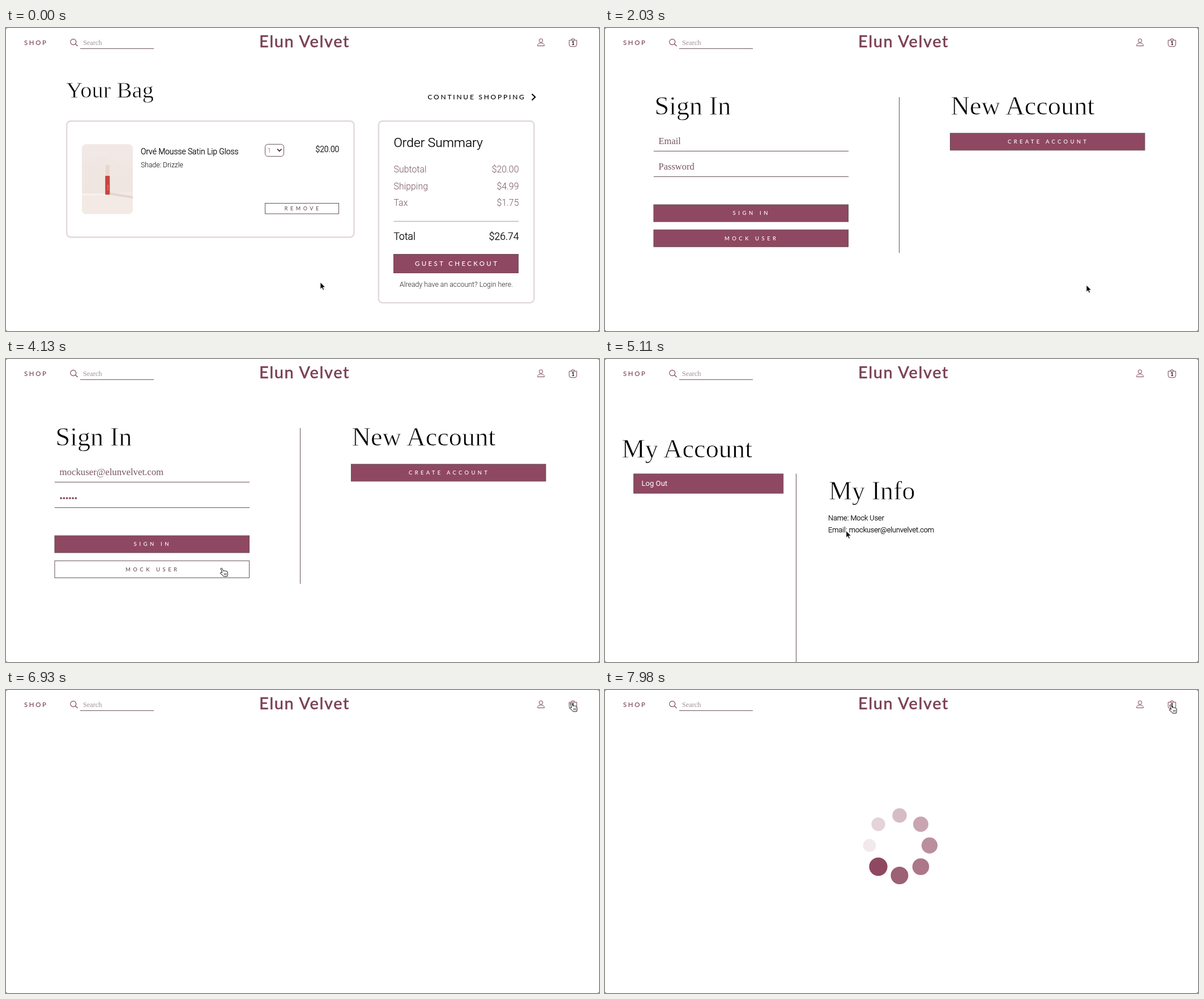
An HTML page for the animation above (8 s loop, 1047 px wide and 535 px high).

```html
<!DOCTYPE html>
<html lang="en">
<head>
<meta charset="utf-8">
<title>Shop checkout</title>
<style>
  html, body { margin: 0; width: 100%; height: 100%; overflow: hidden; background: #fff; }
  svg { display: block; width: 100vw; height: 100vh; }
  text { white-space: pre; }
  .serif { font-family: "Liberation Serif", serif; }
  .title { font-family: "Liberation Serif", serif; stroke: #fff; stroke-width: .8px; }
  .sans { font-family: Roboto, sans-serif; font-weight: 300; }
  .ink { font-family: Roboto, sans-serif; font-weight: 300; stroke: #000; stroke-width: .25px; }
  .caps { font-family: Lato, sans-serif; font-weight: 500; }
</style>
</head>
<body>
<svg id="stage" viewBox="0 0 1047 535" preserveAspectRatio="none"></svg>
<script>
const LOOP = 8000;
const PLUM = '#8f4861', DARK = '#7b4054', MUTED = '#775561', INK = '#000', LINE = '#67505a';

const text = (cls, x, y, size, str, fill = INK, extra = '') =>
  `<text class="${cls}" x="${x}" y="${y}" font-size="${size}" fill="${fill}" ${extra}>${str}</text>`;
const serif = (...a) => text('serif', ...a);
const title = (...a) => text('title', ...a);
const sans = (...a) => text('sans', ...a);
const ink = (x, y, size, str, extra) => text('ink', x, y, size, str, INK, extra);
const END = 'text-anchor="end"', MIDDLE = 'text-anchor="middle"';
const caps = (x, y, size, gap, str, fill, extra = '') =>
  text('caps', x, y, size, str, fill, `letter-spacing="${gap}" ${extra}`);
const capsMid = (x, y, size, gap, str, fill, extra = '') =>
  caps(x + gap / 2, y, size, gap, str, fill, `${MIDDLE} ${extra}`);
const line = (d, color = LINE, width = 1) =>
  `<path d="${d}" fill="none" stroke="${color}" stroke-width="${width}"/>`;
const box = (x, y, w, h, fill, extra = '') =>
  `<rect x="${x}" y="${y}" width="${w}" height="${h}" fill="${fill}" ${extra}/>`;
const card = (x, y, w, h) => box(x, y, w, h, 'none', 'rx="7" stroke="#e5dbde" stroke-width="2.7"');
const button = (x, y, w, h, extra = '') => box(x, y, w, h, PLUM, `stroke="${LINE}" stroke-width="1" ${extra}`);

const header = `
  ${caps(32, 30, 11.5, 2.6, 'SHOP', DARK)}
  <circle cx="118.8" cy="24.6" r="5" fill="none" stroke="${DARK}" stroke-width="1.1"/>
  ${line('M122.5 28.2L126.6 32', DARK, 1.2)}
  ${serif(136, 30, 12.3, 'Search', '#a08f96')}
  ${line('M131 36.4H261')}
  ${capsMid(526.3, 33.8, 29, 1.6, 'Elun Velvet', DARK, `stroke="${DARK}" stroke-width=".4"`)}
  <circle cx="944.5" cy="22.2" r="3.2" fill="none" stroke="${DARK}"/>
  ${line('M938.5 31.5C938.5 28 941 26.6 944.5 26.6S950.5 28 950.5 31.5Z', DARK)}
  ${line('M994.3 21.6H1007.7V29Q1007.7 32.8 1004 32.8H998Q994.3 32.8 994.3 29Z', DARK)}
  ${line('M997.8 21.5Q998 18.8 1001 18.8T1004.2 21.5', DARK)}
  <text class="caps" x="1001" y="30.4" font-size="9" text-anchor="middle" fill="${INK}" style="font-weight:700">1</text>`;

const photo = `
  <g clip-path="url(#photoClip)">
    ${box(134, 205, 90, 124, 'url(#wall)')}
    <path d="M134 238L172 226 224 248V205H134Z" fill="#f4ece9" opacity=".5"/>
    <path d="M134 294L224 289V328H134Z" fill="#f3eae5"/>
    <path d="M182 290L224 297V301L180 294Z" fill="#e4d6cf"/>
    <path d="M134 292L175 293V295L134 296Z" fill="#f8f2ef"/>
    ${box(175.8, 242, 7, 20, '#ead6ce')}
    ${box(175.2, 261, 8, 33.3, '#c8443c', 'rx="1"')}
    <text class="sans" transform="translate(180.6 287) rotate(-90)" font-size="4" fill="#f6d6d0">tinted</text>
  </g>`;

const summary = [['Subtotal', '$20.00', 255], ['Shipping', '$4.99', 284.5], ['Tax', '$1.75', 313.5]]
  .map(([name, cost, y]) => sans(684.5, y, 15.9, name, MUTED) + sans(905.5, y, 15.9, cost, MUTED, END)).join('');

const bag = `
  ${title(106, 123, 40.6, 'Your Bag')}
  ${caps(744.5, 126.3, 12, 2.75, 'CONTINUE SHOPPING', INK)}
  ${line('M928.5 116.5L934.3 122 928.5 127.5', INK, 2)}
  ${card(107.2, 164.3, 507.3, 205)}
  ${photo}
  ${ink(238, 222.5, 13.8, 'Orvé Mousse Satin Lip Gloss')}
  ${sans(238, 246, 12.2, 'Shade: Drizzle')}
  <rect x="457.5" y="205.3" width="33" height="21.4" rx="5" fill="none" stroke="${LINE}"/>
  ${sans(461.5, 220, 11.5, '1', MUTED)}
  ${line('M479 213.7L482.8 217.4 486.6 213.7', '#4a3038', 1.8)}
  ${ink(588.3, 219, 13.9, '$20.00', END)}
  <rect x="457.5" y="309.5" width="130" height="18.5" fill="#fff" stroke="${LINE}"/>
  ${capsMid(522, 321.8, 9, 4.6, 'REMOVE', LINE)}
  ${card(657.8, 164.3, 274.6, 320.8)}
  ${ink(684.5, 210, 22.7, 'Order Summary')}
  ${summary}
  ${line('M684.5 341.3H905', '#a89ca0')}
  ${ink(684.5, 374.3, 17.5, 'Total')}${ink(905.5, 374.3, 17.5, '$26.74', END)}
  ${button(684.5, 399.5, 220, 33)}
  ${capsMid(794.5, 420.3, 11.5, 3.35, 'GUEST CHECKOUT', '#fff')}
  ${sans(795, 456.5, 12.35, 'Already have an account? Login here.', '#222', MIDDLE)}`;

const signIn = `
  ${title(87.5, 152.5, 46.2, 'Sign In')}
  ${title(610.5, 152.5, 46.4, 'New Account')}
  ${line('M519.5 122V397')}
  ${line('M86 217.4H430M86 262.5H430')}
  <g id="blank">${serif(94.5, 205, 16.5, 'Email', MUTED)}${serif(94.5, 250, 16.5, 'Password', MUTED)}</g>
  <g id="filled">${serif(94.5, 205, 16.8, 'mockuser@elunvelvet.com', MUTED)}${serif(94.5, 251, 15, '••••••', DARK)}</g>
  ${button(86, 312, 343.5, 30)}
  ${capsMid(256.5, 330.4, 9.5, 4.6, 'SIGN IN', '#fff')}
  ${button(86, 356.3, 343.5, 30, 'id="demo"')}
  ${capsMid(256.5, 374.6, 9.5, 4.5, 'MOCK USER', '#fff', 'id="demoLabel"')}
  ${button(609.5, 185.8, 343.5, 30)}
  ${capsMid(780.5, 204.3, 9.5, 4.3, 'CREATE ACCOUNT', '#fff')}`;

const account = `
  ${title(29.5, 173.5, 46.4, 'My Account')}
  ${button(50.7, 202.9, 264, 34.2)}
  ${sans(64.5, 224.3, 13.1, 'Log Out', '#fff', 'style="font-weight:400"')}
  ${line('M337.5 202.5V535')}
  ${title(395, 248, 46.2, 'My Info')}
  ${ink(394, 284.5, 12.7, 'Name: Mock User')}
  ${ink(394, 305.5, 12.7, 'Email: mockuser@elunvelvet.com')}`;

const dots = Array.from({ length: 8 }, (_, i) => {
  const a = (i - 1) * Math.PI / 4;
  return `<circle cx="${520 + 53 * Math.cos(a)}" cy="${274.5 + 53 * Math.sin(a)}" fill="${PLUM}"/>`;
}).join('');

const stage = document.getElementById('stage');
stage.innerHTML = `
  <defs>
    <clipPath id="photoClip"><rect x="134" y="205" width="90" height="123.5" rx="8"/></clipPath>
    <linearGradient id="wall" x2="0" y2="1">
      <stop stop-color="#f0e7e4"/><stop offset="1" stop-color="#efe5e0"/>
    </linearGradient>
  </defs>
  ${box(0, 0, 1047, 535, '#fff')}
  ${header}
  <g id="bag">${bag}</g>
  <g id="signIn">${signIn}</g>
  <g id="account">${account}</g>
  <g id="spinner">${dots}</g>
  <g id="cursor">
    <circle id="ring" r="27" fill="none" stroke="#111" stroke-width="1.5"/>
    <path id="arrow" d="M0 0V12L2.8 9.5 4.6 13.8 6.6 13 4.8 8.8H8.6Z" fill="#000" stroke="#fff" stroke-width=".8"/>
    <g id="hand" stroke="#111" stroke-linejoin="round">
      <path d="M-3 .9Q-1.5-.6-.4.9L1.6 5.2Q3.2 4.2 4.2 5.3 5.9 4.5 6.8 5.7 8.4 5.4 8.9 7L9.4 10.5Q9.2 12.5 8.6 15H2.2Q.6 12-3.6 9.6-4.2 7.8-2 7.8L-.2 8.2Z" fill="#fff"/>
      <path d="M3.4 9.4V12.4M5.2 9.4V12.4M7 9.4V12.4" fill="none" stroke-width=".8"/>
    </g>
  </g>
  <path d="M0 0H3Q0 0 0 3ZM1047 0H1044Q1047 0 1047 3ZM0 535H3Q0 535 0 532ZM1047 535H1044Q1047 535 1047 532Z" fill="#444"/>`;

const el = id => document.getElementById(id);
const show = (id, on) => el(id).setAttribute('display', on ? 'inline' : 'none');
const clamp = v => Math.min(1, Math.max(0, v));
const within = (t, a, b) => t >= a && t < b;
const mix = (a, b, k) => `rgb(${a.map((v, i) => Math.round(v + (b[i] - v) * k))})`;

// time, x, y of the pointer tip
const path = [
  [0, 555, 449], [840, 815, 456], [1050, 834, 458], [1130, 834, 458], [1470, 850, 454],
  [2380, 850, 454], [2800, 506, 383], [3000, 506, 383], [3080, 402, 372], [3200, 402, 372],
  [3570, 382, 369], [4970, 382, 369], [5390, 549, 119], [5480, 549, 119], [6160, 999, 23],
  [7950, 999, 23], [7980, 1000, 26], [LOOP, 1000, 26]
];

function pointer(t) {
  const i = path.findIndex(p => p[0] > t);
  const [t0, x0, y0] = path[i - 1], [t1, x1, y1] = path[i];
  const u = (t - t0) / (t1 - t0), k = u * u * (3 - 2 * u);
  return [x0 + (x1 - x0) * k, y0 + (y1 - y0) * k];
}

function render(t) {
  const onBag = t < 2030, onSignIn = within(t, 2030, 4550);
  show('bag', onBag);
  show('signIn', onSignIn);
  show('account', within(t, 4550, 6930));
  show('spinner', t >= 7140);
  show('blank', t < 3990);
  show('filled', t >= 3990);

  const hover = clamp((t - 3200) / 350);
  el('demo').setAttribute('fill', mix([143, 72, 97], [255, 255, 255], hover));
  el('demoLabel').setAttribute('fill', mix([255, 255, 255], [103, 80, 90], hover));

  [...el('spinner').children].forEach((dot, i) => {
    const turns = (t - 7350) / 1260 + 0.005 - i / 8;
    const age = turns - Math.floor(turns);
    dot.setAttribute('r', 16.2 - 5.4 * age);
    dot.setAttribute('fill-opacity', 1 - age);
  });

  const [x, y] = pointer(t);
  const overLink = onBag ? x >= 833
    : onSignIn ? x < 430 && y >= 356 && y < 387
    : x > 990;
  el('cursor').setAttribute('transform', `translate(${x} ${y})`);
  show('hand', overLink);
  show('arrow', !overLink);
  show('ring', within(t, 1610, 1890) || within(t, 3780, 3990) || within(t, 6440, 6650));
}

const start = performance.now();
function tick() {
  render((performance.now() - start) % LOOP);
  requestAnimationFrame(tick);
}
tick();
</script>
</body>
</html>
```
